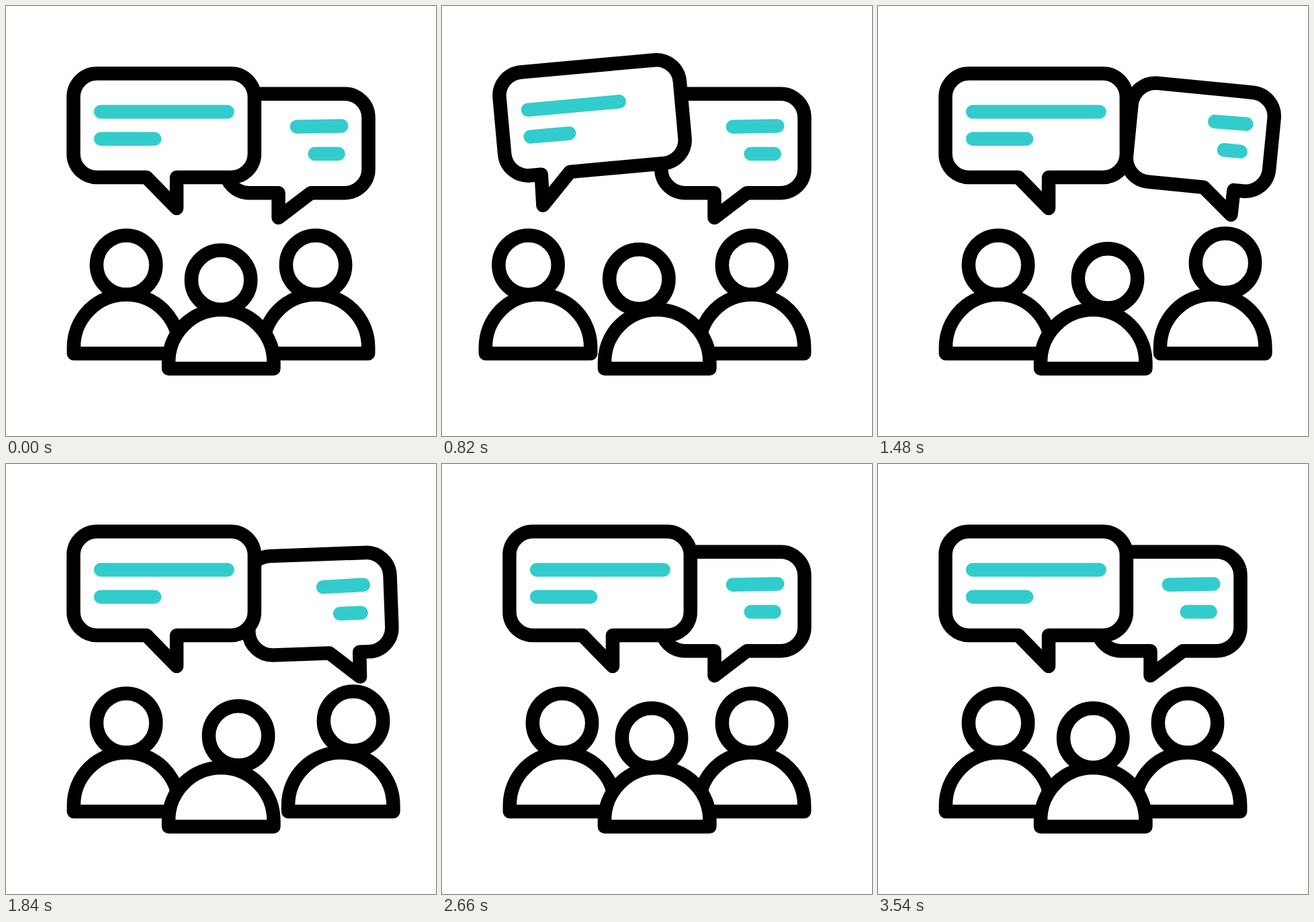
An HTML page for the animation above (3600 ms loop, 640 px wide and 640 px high).

```html
<!DOCTYPE html>
<html lang="en">
<head>
<meta charset="utf-8">
<title>Group discussion</title>
<style>
  html, body { margin: 0; width: 100%; height: 100%; overflow: hidden; background: #fff; }
  svg { display: block; width: 100vw; height: 100vh; }
  .ink { fill: #fff; stroke: #000; stroke-width: 20.5; stroke-linejoin: round; }
  .line { stroke: #3cc; stroke-width: 20.5; stroke-linecap: round; }
</style>
</head>
<body>
<svg viewBox="0 0 640 640">
  <g id="bubbleR">
    <path class="ink" id="shapeR"/>
    <line class="line" id="r1" x2="499.3" y2="178.5"/>
    <line class="line" id="r2" x2="494.6" y1="220" y2="220"/>
  </g>
  <g id="bubbleL">
    <path class="ink" id="shapeL"/>
    <line class="line" id="l1" x1="141" y1="157.5" y2="157.5"/>
    <line class="line" id="l2" x1="141" y1="197.7" y2="197.7"/>
  </g>
  <circle class="ink" id="headL" r="44.2"/>
  <path class="ink" id="bodyL"/>
  <circle class="ink" id="headR" r="44.2"/>
  <path class="ink" id="bodyR"/>
  <circle class="ink" id="headC" r="44.2"/>
  <path class="ink" id="bodyC"/>
</svg>
<script>
const LOOP = 3600;
const el = id => document.getElementById(id);
const set = (id, attrs) => {
  for (const k in attrs) el(id).setAttribute(k, attrs[k]);
};
const mix = (a, b, f) => a + (b - a) * f;
const ease = u => u * u * (3 - 2 * u);

// Eased value from [time, value] pairs
function track(keys, t) {
  if (t <= keys[0][0]) return keys[0][1];
  for (let i = 1; i < keys.length; i++) {
    const [t0, a] = keys[i - 1], [t1, b] = keys[i];
    if (t < t1) return mix(a, b, ease((t - t0) / (t1 - t0)));
  }
  return keys[keys.length - 1][1];
}

const timesL = [0, 290, 580, 870, 1155, 1445];
const timesR = [1155, 1445, 1735, 2015, 2290, 2580];
const along = (times, values) => times.map((t, i) => [t, values[i]]);

const lean = [0, 1, 1, 1, 1, 0];
const rock = [0, 6.1, -6, 6.1, -6, 0];
const size = [1, 0.7, 1, 0.7, 1, 1];
const side = times => ({
  lean: along(times, lean), rock: along(times, rock), size: along(times, size)
});
const left = side(timesL), right = side(timesR);

const nod = [[0, 0], [290, -29.5], [692, -29.5], [1637, 26], [2290, 26],
  [2793, -15], [3260, 15.5], [3560, 0]];

// Rounded speech bubble; a and b are the tail's base, tip its point
function bubble(x0, y0, x1, y1, r, a, b, tipX, tipY) {
  const arc = (x, y) => `A${r} ${r} 0 0 1 ${x} ${y}`;
  return `M${x0 + r} ${y0}H${x1 - r}${arc(x1, y0 + r)}V${y1 - r}${arc(x1 - r, y1)}` +
    `H${b}L${tipX} ${tipY}L${a} ${y1}H${x0 + r}${arc(x0, y1 - r)}V${y0 + r}${arc(x0 + r, y0)}Z`;
}

const body = (x, y) =>
  `M${x - 78.2} ${y}v-9.5a78.2 78.2 0 0 1 156.4 0v9.5Z`;

function draw(t) {
  const pL = track(left.lean, t), pR = track(right.lean, t);
  const sL = track(left.size, t), sR = track(right.size, t);

  set('bubbleL', { transform: `rotate(${-track(left.rock, t)} 102.6 300)` });
  set('shapeL', { d: bubble(100.4, 100.6, 369.8, 255, 35,
    mix(209, 152, pL), mix(254, 195, pL), mix(254, 150.5, pL), 301) });
  set('l1', { x2: 141 + 188.6 * sL });
  set('l2', { x2: 141 + 80 * sL });

  set('bubbleR', { transform: `translate(${37 * pR} 0) rotate(${track(right.rock, t)} 533 301)` });
  set('shapeR', { d: bubble(326.3, 130.7, 539.5, 278.2, 35.5,
    mix(405.5, 445, pR), mix(454, 490, pR), mix(405.5, 489.5, pR), 315) });
  set('r1', { x1: 499.3 - 66.4 * sR, y1: 178.5 + 1.2 * sR });
  set('r2', { x1: 494.6 - 35 * sR });

  set('headL', { cx: 179 - 50.5 * pL, cy: 385.6 });
  set('bodyL', { d: body(179 - 36 * pL, 517.2) });
  set('headR', { cx: 461 + 56 * pR, cy: 385.6 - 3 * pR });
  set('bodyR', { d: body(461 + 37.2 * pR, 517.2) });

  const dx = track(nod, t);
  set('headC', { cx: 320 + dx, cy: 407.8 - dx * dx * (dx < 0 ? 0.0018 : 0.005) });
  set('bodyC', { d: body(320.2, 539.7) });
}

const start = performance.now();
function tick() {
  draw((performance.now() - start) % LOOP);
  requestAnimationFrame(tick);
}
draw(0);
requestAnimationFrame(tick);
</script>
</body>
</html>
```
